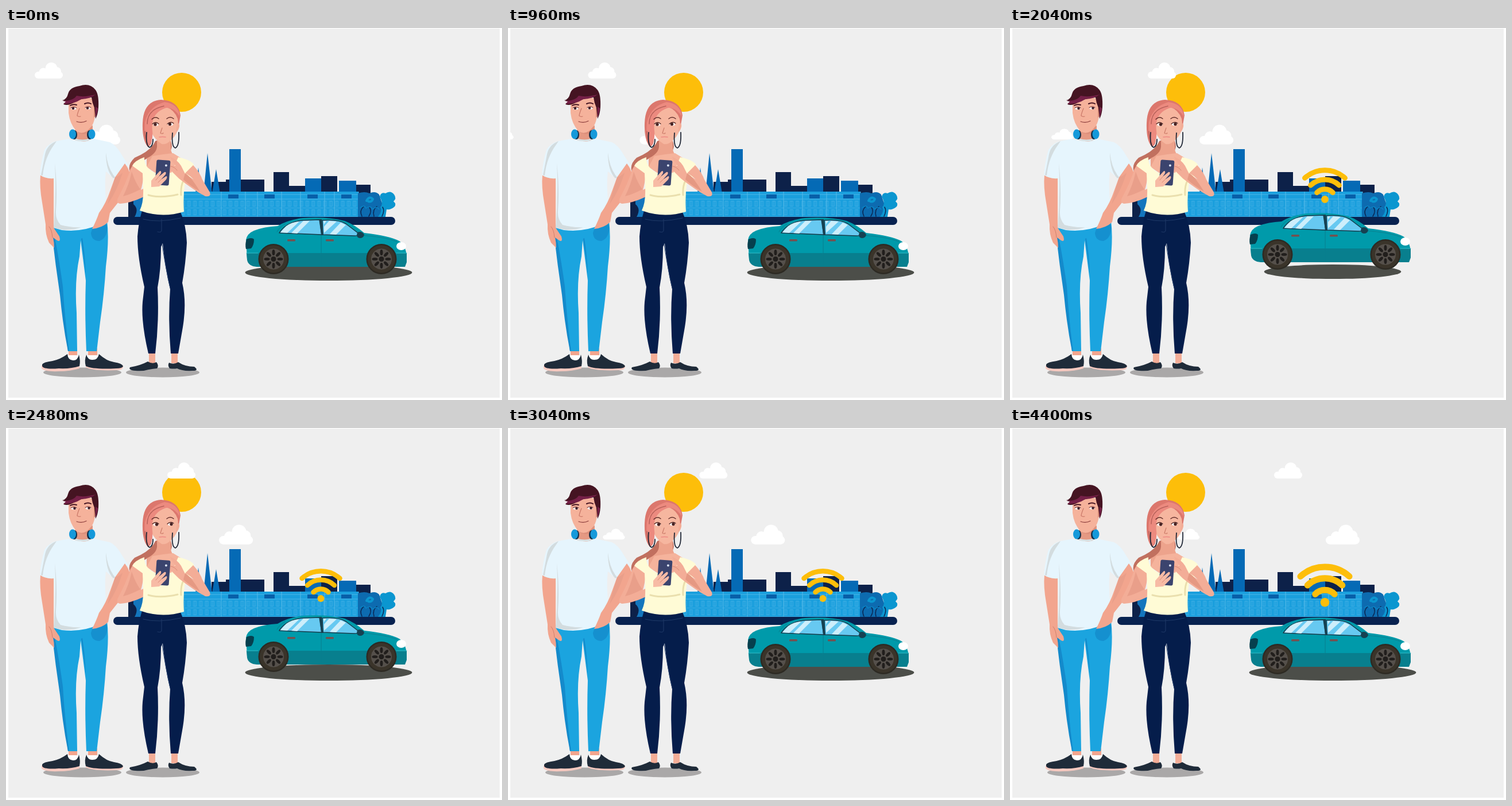
An HTML page that plays this animation: 864x648 px, repeating every 4.44 s.

```html
<!DOCTYPE html>
<html lang="en">
<head>
<meta charset="utf-8">
<title>City, car and couple</title>
<style>
html, body { margin: 0; width: 100%; height: 100%; overflow: hidden; background: #fff; }
svg { display: block; width: 100vw; height: 100vh; }
.line { fill: none; stroke-linecap: round; stroke-linejoin: round; }
</style>
</head>
<body>
<svg viewBox="0 0 864 648" xmlns="http://www.w3.org/2000/svg">
<defs>
  <g id="cloud" fill="#fff">
    <rect y="16" width="49" height="12" rx="6"/>
    <circle cx="15" cy="17" r="7.5"/><circle cx="29" cy="10.5" r="10.5"/><circle cx="38" cy="16" r="8"/>
  </g>
  <pattern id="windows" x="304" y="299" width="10.3" height="15" patternUnits="userSpaceOnUse">
    <path d="M2 2.5h5v9h-5zM4.5 2.5v9M0 14.5h10.3" fill="none" stroke="#4bb3e6" stroke-width=".7"/>
  </pattern>
  <g id="wheel">
    <circle r="26.5" fill="#2d2a23"/><circle r="24" fill="#3a342a"/><circle r="18" fill="#55504b"/>
    <g id="spokes" fill="#211e1c"></g>
    <circle r="4.5" fill="#211e1c"/>
  </g>
</defs>

<rect x="4" y="1" width="856" height="643" fill="#efefef"/>
<circle cx="306" cy="112" r="34" fill="#fdbe0a"/>
<use id="cloudA" href="#cloud"/>
<use id="cloudC" href="#cloud"/>

<g id="city">
  <path fill="#0d2149" d="M358 268h25v-4h67v26h16v-39h27v24h28v-13h28v-4h28v32h25v-17h33v17H358z"/>
  <path fill="#056ab5" d="M389 211h20v77h-20zM521 262h28v24h-28zM580 266h30v20h-30zM330 288l5-45 6 45zM344 288l7-70 8 70zM359 288l7-42 7 42z"/>
  <path fill="#0d2149" d="M213 292h32v37h-32z"/>
  <path fill="#1476bd" d="M222 288q18-6 22 8v33h-20q8-14-2-22z"/>
  <path fill="#1a9fdd" d="M240 285h374v44H240z"/>
  <path fill="url(#windows)" d="M304 299h310v30H304z"/>
  <path class="line" stroke="#4db5e7" d="M304 290h310M304 298h310"/>
  <g id="gables"></g>
  <path fill="#0d6bb0" d="M613 288q12-4 20 0 10-5 17 2l4 12q4 7 0 14l2 13h-43z"/>
  <path fill="#0b96d0" d="M651 294q2-9 10-6 9-6 15 2 5 7-1 12 6 5 1 10-6 5-13 4l-2 13h-13q8-10 4-17 6-6-1-18z"/>
  <g class="line" stroke="#092450" stroke-width="1.5">
    <path d="M620 328q-5-10 3-17M632 328q6-9 1-16M641 328q-3-12 5-17M655 328q5-10 1-16"/>
    <path d="M617 313q8-6 10 1 8-6 12 2 6-7 11 0" stroke="#0a83c4"/>
    <path d="M628 301q5-9 11-3-2 6-8 4" stroke="#0b96d0" stroke-width="4"/>
  </g>
  <rect x="187" y="329" width="491" height="14" rx="7" fill="#082250"/>
</g>
<use id="cloudB" href="#cloud"/>

<ellipse cx="133" cy="600" rx="68" ry="8.5" fill="#aaa8a8"/>
<ellipse cx="273" cy="600" rx="64" ry="8.5" fill="#aaa8a8"/>

<g id="man">
  <path fill="#f2a58e" d="M109 558h15v18h-15zM143 558h16v18h-16z"/>
  <path fill="#fff" d="M106 570h21v14h-21zM138 570h22v14h-22z"/>
  <path fill="#f7c9c0" d="M62 588l66-2v7q-16 5-36 5-25 1-30-5zM139 586l65 2q1 7-8 8-45 2-57-5z"/>
  <path fill="#1f2b39" d="M63 586q2-4 18-6 14-3 26-12 1 11 10 11 8 0 10-10 3 11 1 20-15 5-36 4-27 2-29-4zM139 589q-3-10 1-20 3 10 11 9 9 0 11-10 13 12 26 14 14 2 16 7-1 4-12 4-40 2-53-4z"/>
  <path fill="#1ba4df" d="M84 342L176 336Q180 368 174 415Q171 465 164 512L158 563H140Q137 500 139 440L130 370L128 398Q119 440 123 496L124 563H108Q102 512 95 466Q91 410 80 358z"/>
  <path fill="#148acb" d="M80 358q6 54 14 107 5 53 14 98h2q-8-60-11-113-6-44-14-85zM131 367q5 32 8 63-1-33-6-64z"/>
  <path fill="#1590cf" d="M148 357q4-17 20-19l8 5q2 22-13 28-14 0-15-14z"/>
  <path fill="#f2a58e" d="M60 256Q58 276 63 304L69 342Q68 359 75 374L84 383Q84 374 82 365L89 370Q96 374 93 363L83 348V262z"/>
  <path class="line" stroke="#cf806d" d="M75 346q5 5 6 19"/>
  <path fill="#e6f5fd" d="M109 193Q131 202 153 193L181 199Q192 204 201 220L213 239Q204 254 188 262L174 250Q171 276 175 309Q174 333 162 342Q134 356 97 352L83 348Q88 300 83 262Q69 263 59 256Q61 232 67 212Q75 200 88 197z"/>
  <path fill="#d3dcdf" d="M88 197Q71 204 68 220L61 256L64 257Q67 226 84 203zM85 235q5 45 2 84-1 14 8 24 18 5 36 4-16 6-34 4l-14-3q5-57 2-113zM174 217q3 28 16 43l-3 2q-13-13-13-45z"/>
  <path fill="#f2a58e" d="M207 236Q218 250 216 264Q211 283 196 303L181 322L178 338Q168 348 150 350Q158 334 162 322Q174 306 182 282L190 260z"/>
  <path fill="#e99f8a" d="M190 260Q196 259 203 252Q194 283 177 307Q183 282 190 260z"/>
  <path fill="#e59983" d="M121 170h30v22q-15 11-31 0z"/>
  <path fill="#f5b29b" d="M109 128Q130 112 157 126Q164 140 155 153Q153 172 140 181Q131 186 122 179Q111 166 109 148z"/>
  <path fill="#dd8f7b" d="M153 139q8-3 7 6-2 9-7 11zM124 181q14 6 25-10v9q-13 9-25 1z"/>
  <path fill="#451422" d="M98 126Q106 124 108 115Q111 103 128 101Q146 95 156 108Q162 116 161 138Q160 151 156 158L154 139Q150 130 149 121Q131 122 118 130Q108 136 100 133Q104 130 105 128z"/>
  <path fill="#752047" d="M99 127q18 0 24-9 14 3 33-2-9 7-25 8-13 9-31 8 3-2 4-4zM156 137l4 3-4 17z"/>
  <path class="line" stroke="#451422" stroke-width="2" d="M112 135q5-3 11-1M137 132q6-3 11 0"/>
  <g fill="#fff"><ellipse cx="118" cy="140.200" rx="4.500" ry="2"/><ellipse cx="143" cy="139.700" rx="4.500" ry="2"/></g>
  <g id="manEyes" fill="#40202a"><circle cx="117" cy="140" r="2.3"/><circle cx="142" cy="139.500" r="2.3"/></g>
  <path class="line" stroke="#5a2530" d="M113 139q5-3 10 0M138 138.500q5-3 10 0"/>
  <path class="line" stroke="#c97767" stroke-width="1.2" d="M128 140q-4 10-4 13 3 2 6 1"/>
  <path class="line" stroke="#8b3c3b" stroke-width="1.2" d="M123 163q9 3 17-1"/>
  <path class="line" stroke="#d9e2e5" stroke-width="3" d="M117 193q17 6 31 0"/>
  <g fill="#14304a"><ellipse cx="119" cy="186" rx="5" ry="8"/><ellipse cx="146" cy="186" rx="5" ry="8"/></g>
  <g fill="#1599da"><ellipse cx="116" cy="185" rx="6" ry="8.5"/><ellipse cx="149.500" cy="185" rx="6" ry="8.5"/></g>
</g>

<g id="woman">
  <path fill="#f3ad97" d="M249 562h11v22h-11zM288 562h11v22h-11z"/>
  <path fill="#1f2b39" d="M216 591q18-3 31-10 8 5 15 1 5 6 1 11-14 1-23 4-29 1-24-6zM284 583q8 4 16-1 12 8 28 8 9 7-3 7-18 1-27-4-6 1-13 0-4-5-1-10z"/>
  <path fill="#051d4b" d="M237 318H303Q314 343 315 374Q313 411 307 444Q315 478 308 521L300 567H287Q282 506 286 455Q277 419 273 375L270 381Q270 421 264 452Q267 510 260 567H248Q235 512 238 477L241 451Q229 400 229 363Q231 338 237 318z"/>
  <path class="line" stroke="#203b69" d="M239 333q25 7 65-2M271 333v20q-1 4-7 2M272 377q5 35 14 76"/>
  <path fill="#c1705f" d="M283 188Q294 208 284 216Q255 219 235 234L216 251Q211 238 224 226Q253 214 260 197z"/>
  <path fill="#f3ad97" d="M222 237L241 249Q238 273 235 282L265 267L273 275L240 294Q217 305 199 306Q190 305 196 294Q211 266 216 247z"/>
  <path fill="#e99f8a" d="M219 250q6 19 15 31-17 9-30 12 11-22 15-43z"/>
  <path fill="#eda38c" d="M263 190h24v18q0 12 10 18l-8 23q-25 9-44-8v-14q17-8 18-20z"/>
  <path fill="#f5b39c" d="M255 223q17-3 36-5l13 8-12 25-24 7-23-16z"/>
  <path fill="#fffbd6" d="M241 225Q240 242 258 252H288L300 225Q323 230 327 238Q331 249 327 257L312 267Q308 292 310 320Q271 332 233 318Q240 304 239 279L238 253L220 240Q224 231 241 225z"/>
  <path class="line" stroke="#eadfae" stroke-width="3" d="M248 291q21 6 51-1M309 266q-5 10-4 25"/>
  <path fill="#f3ad97" d="M326 239Q338 252 342 264L355 286Q358 295 347 293Q326 282 301 262L289 250Q280 244 284 239L295 240Q289 230 285 224Q297 228 305 240L312 254L327 264Q318 255 312 253z"/>
  <path fill="#e59983" d="M312 253q9 4 26 32-16-9-29-21z"/>
  <g transform="rotate(4 273 252)">
    <rect x="261" y="230" width="24" height="44" rx="3" fill="#3b446e"/>
    <circle cx="278" cy="239" r="2" fill="#dbe3f4"/>
  </g>
  <path fill="#f7bba5" d="M253 266L267 250Q271 247 270 253L266 259L276 251Q280 250 278 255L270 264L279 258Q282 258 279 264L267 276L253 277z"/>
  <path class="line" stroke="#d98b76" d="M266 259l-5 6M270 264l-5 5M287 241q7 1 11 7"/>
  <path fill="#dc776d" d="M238 166Q239 127 270 125Q300 126 304 152L301 169L290 178L254 184Q256 204 247 207Q237 195 238 166z"/>
  <path fill="#f6b69f" d="M251 160Q254 141 278 137Q294 143 299 158Q303 182 288 195Q279 204 271 202Q256 192 252 177z"/>
  <path fill="#ec8a7f" d="M242 164Q248 137 276 129Q301 132 303 155Q294 139 279 139Q251 148 255 179Q257 197 247 207Q240 190 242 164z"/>
  <path class="line" stroke="#b9625b" stroke-width="1.500" d="M246 167q0-25 29-31M242 180q1 14 5 22"/>
  <path fill="#f3ad97" d="M298 167q5-3 4 5-2 8-6 10z"/>
  <path class="line" stroke="#632f2b" stroke-width="1.400" d="M254 159q6-6 12-1M280 158q6-5 12 0"/>
  <g fill="#fff"><ellipse cx="261" cy="168.300" rx="4.500" ry="2.500"/><ellipse cx="286.500" cy="167.800" rx="4.500" ry="2.500"/></g>
  <g id="womanEyes" fill="#4a2424"><circle cx="260" cy="168" r="2.700"/><circle cx="285.500" cy="167.500" r="2.700"/></g>
  <path class="line" stroke="#4a2424" stroke-width="1.200" d="M255 167q6-5 11 0M281 167q6-5 11-1"/>
  <path class="line" stroke="#cb7b68" stroke-width="1.200" d="M272 174l-3 9q3 2 5 0"/>
  <path class="line" stroke="#ed8984" stroke-width="1.500" d="M267 190q6-1 11 0"/>
  <g class="line" stroke="#1f2635" stroke-width="1.800"><path d="M245 182q-2 23 5 26 6-2 6-14M290 183q-2 24 5 26 7-3 6-27"/></g>
</g>

<g id="device">
  <rect x="-17.500" y="-26" width="35" height="52" fill="#4b4a4b"/>
  <rect x="-17.500" y="20" width="35" height="6" fill="#211e1f"/>
</g>

<ellipse id="shadow" rx="145.500" ry="14" fill="#4c4e49"/>
<g id="car">
  <path fill="#009aaa" d="M418 369Q420 358 432 353Q450 346 473 345Q491 334 517 331Q558 328 590 336Q608 343 624 357Q668 362 685 371Q696 378 698 397L695 415H437Q422 414 420 402z"/>
  <path fill="#087f8e" d="M419 392H698V408L695 416H437Q422 415 420 404z"/>
  <path class="line" stroke="#35bfca" d="M680 392h18M419 392h20"/>
  <path class="line" stroke="#087f8e" d="M486 341q-10 6-14 14M549 334v79M617 361q40 2 64 11"/>
  <path fill="#063f4e" d="M419 368q9-4 13 0 0 10-5 16l-9 1q-2-7 1-17z"/>
  <ellipse cx="688.500" cy="380" rx="8.500" ry="7" fill="#fff"/>
  <path id="glass" fill="#67c9f1" stroke="#173b4a" stroke-width="1.500" stroke-linejoin="round" d="M476 357Q488 338 517 335L546 334L550 360zM551 335Q579 333 592 341L613 357Q617 362 607 362L552 360z"/>
  <path fill="#cdeefb" d="M488 345q10-7 23-8l-21 20-12-1zM518 336h11l-22 22-10-1zM553 336h5l-4 6zM563 336l13 1-22 20v-11zM583 339l9 4-17 17-11-1z"/>
  <path fill="#164152" d="M546 333h4l3 28h-4zM612 356q8-3 12 4-1 6-8 6-7-1-4-10z"/>
  <g fill="#76504f"><rect x="490" y="368" width="14" height="3.500" rx="1.500"/><rect x="557" y="368" width="14" height="3.500" rx="1.500"/></g>
  <use href="#wheel" x="466" y="402.500"/>
  <use href="#wheel" x="654" y="402.500"/>
</g>

<g id="wifi">
  <circle cy="23" r="6" fill="#fdbe0a"/>
  <path class="line" stroke="#fdbe0a" stroke-width="8.500" d="M-33-12A49 49 0 0 1 33-12M-23.500 0A34 34 0 0 1 23.500 0M-13 12A18 18 0 0 1 13 12"/>
</g>
</svg>

<script>
const LOOP = 4440, STEP = 40, CLOUD_SPEED = 410 / 4400;
const $ = id => document.getElementById(id);
const clamp = v => Math.max(0, Math.min(1, v));
const span = (t, from, to) => clamp((t - from) / (to - from));
const ease = p => p * p * (3 - 2 * p);
const hop = (t, from, to) => Math.sin(Math.PI * span(t, from, to));
const place = (id, x, y, extra = '') =>
  $(id).setAttribute('transform', `translate(${x} ${y}) ${extra}`);

$('spokes').innerHTML = Array.from({ length: 8 }, (_, i) =>
  `<ellipse cy="-11.5" rx="2.5" ry="5" transform="rotate(${i * 45})"/>`).join('');
$('gables').innerHTML = [387, 450, 525, 584].map(x =>
  `<path d="M${x} 290h18v7h-18z" fill="#075fa9"/>` +
  `<path d="M${x - 12} 285v44M${x + 30} 285v44" stroke="#56b9e8" stroke-width="1"/>`).join('');

function draw(t) {
  const drift = t * CLOUD_SPEED;
  place('cloudA', 50 + drift, 60);
  place('cloudB', 140 + drift, 168.5, 'scale(1.205 1.22)');
  place('cloudC', -118 + drift, 175.5, 'scale(.78 .67)');

  const glance = 2.5 * ease(span(t, 1160, 1400));
  place('manEyes', glance, 0);
  place('womanEyes', glance, 0);

  // The device is thrown in an arc and lands in the car.
  const p = span(t, 1110, 1760);
  $('device').style.display = p > 0 && p < 1 ? '' : 'none';
  place('device', 273 + 275 * p, 250 + 112 * p - 776 * p * (1 - p),
    `rotate(${50 * p}) scale(${Math.min(1, .3 + p)})`);

  const jump = hop(t, 1780, 2290);
  const lift = 8 * jump + 4 * hop(t, 2290, 2680) + 1.5 * hop(t, 2680, 2960);
  place('car', 0, -lift);
  place('shadow', 562, 426 - 1.5 * jump, `scale(${1 - .18 * jump} ${1 - .1 * jump})`);

  const pop = 1.1 * ease(span(t, 1840, 1980)) - .1 * ease(span(t, 1980, 2120));
  const size = pop + .29 * ease(span(t, 3080, 3340));
  $('wifi').style.display = size > 0 ? '' : 'none';
  place('wifi', 548.5, 274, `scale(${size})`);
}

const start = performance.now();
function tick() {
  const t = (performance.now() - start) % LOOP;
  draw(Math.floor(t / STEP) * STEP);
  requestAnimationFrame(tick);
}
tick();
</script>
</body>
</html>
```
